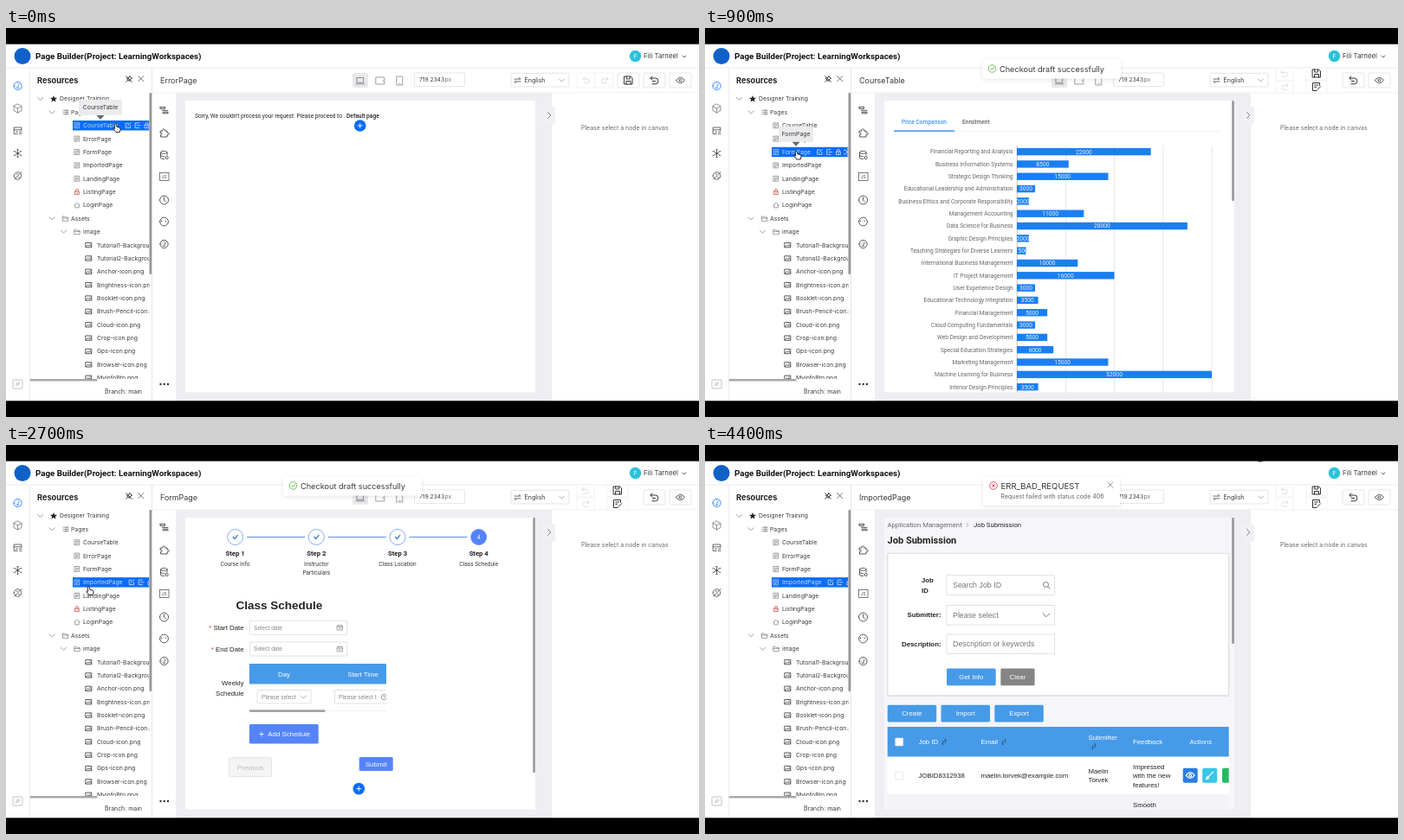
These frames come from a looping animation (800 px wide and 450 px high, 4700 ms). An HTML page:

```html
<!DOCTYPE html>
<html lang="en">
<head>
<meta charset="utf-8">
<title>Page Builder</title>
<style>
  html, body { margin: 0; width: 100%; height: 100%; overflow: hidden; background: #000; }
  svg { display: block; width: 800px; height: 450px; font-family: Inter, sans-serif; }
  .rob { font-family: Roboto, sans-serif; }
  .lib { font-family: "Liberation Sans", Arial, sans-serif; }
  .bold { font-weight: 700; }
  .med { font-weight: 500; }
  .mid { text-anchor: middle; }
  .end { text-anchor: end; }
</style>
</head>
<body>
<svg id="stage" viewBox="0 0 800 450"></svg>
<script>
const LOOP = 4700;
const BLUE = '#0b6cf5', SKY = '#469ae8', INDIGO = '#5584f9', INK = '#3a3a3a', GREY = '#888';

// Drawing helpers: y of a text is the middle of its capitals.
const text = (x, y, s, size, fill = INK, cls = '') =>
  `<text x="${x}" y="${y + size * 0.36}" font-size="${size}" fill="${fill}" class="${cls}">${s}</text>`;
const rect = (x, y, w, h, fill, stroke = 'none', r = 0) =>
  `<rect x="${x}" y="${y}" width="${w}" height="${h}" fill="${fill}" stroke="${stroke}" stroke-width=".7" rx="${r}"/>`;
const circle = (x, y, r, fill, stroke = 'none') =>
  `<circle cx="${x}" cy="${y}" r="${r}" fill="${fill}" stroke="${stroke}" stroke-width=".8"/>`;
const icon = (x, y, d, color = '#444', width = 0.9) =>
  `<path transform="translate(${x} ${y})" d="${d}" fill="none" stroke="${color}" stroke-width="${width}" stroke-linecap="round" stroke-linejoin="round"/>`;
const group = (id, body, attrs = '') => `<g id="${id}" ${attrs}>${body}</g>`;

const ring = r => `M${-r} 0a${r} ${r} 0 1 0 ${2 * r} 0a${r} ${r} 0 1 0 ${-2 * r} 0`;
const I = {
  down: 'M-3-1.5L0 1.5 3-1.5', right: 'M-1.5-3.5L2 0-1.5 3.5', cross: 'M-3-3L3 3M3-3L-3 3',
  plus: 'M-2.5 0h5M0-2.5v5', check: 'M-2.5 0L-.6 2 2.7-2',
  gauge: ring(4.6) + 'M0 1L2-2M-2.5 0h.1M0-2.7h.1M-1.3 2.2h2.6',
  cube: 'M0-5L4.5-2.5V2.5L0 5-4.5 2.5V-2.5ZM-4.5-2.5L0 0 4.5-2.5M0 0V5',
  board: 'M4.3-.5v-3.5h-8.6v7.5h4M-4.3-1.2h8.6M-2 1.2h2M2 1.3h2.5M2 3.4h2.5',
  network: 'M0-4V4M-3.6-2.3L3.6 2.3M3.6-2.3L-3.6 2.3M-1 0h2M-.8-4.3h1.6M-.8 4.3h1.6M-4.4-2.5h.8M3.6-2.5h.8M-4.4 2.5h.8M3.6 2.5h.8',
  slashed: ring(4.3) + 'M-3.5 4L4.5-4.5M-1.5-2h1.5M1 2h1.5',
  layers: 'M-4.5-3.5h5.5M-4.5-3.5v2h5.5v-2M-2 .4h6.5M-1 3.8h5.5v-1.6h-5.5Z',
  puzzle: 'M-4-2h2.5c-1-3 3.5-3 2.5 0h2.5v2.2c3-.8 3 3.2 0 2.4V5H-4V2.5c2.5.5 2.5-3 0-2Z',
  database: 'M-4-3.2c0-2 7.5-2 7.5 0s-7.5 2-7.5 0V3c0 1 2 1.6 4 1.6M3.5-3.2V0M-4 0c0 1 2 1.5 4 1.5M1.5 3a1.6 1.6 0 1 0 3.2 0a1.6 1.6 0 1 0-3.2 0',
  clock: ring(5) + 'M0-3V.3L2 2',
  chat: ring(4.9) + 'M-3-1v.8M1.8-1v.8',
  page: 'M-2.7-3h5.4v6h-5.4ZM-1.4-1.2h2.8M-1.4.3h2.8M-1.4 1.6h1.4',
  lock: 'M-2.3-.5h4.6v3.5h-4.6ZM-1.4-.5v-1.3a1.4 1.4 0 0 1 2.8 0v1.3M0 1v.8',
  home: 'M-3 0L0-2.9 3 0M-2.2-.5V2.9h4.4V-.5',
  list: 'M-1.2-2.2h4M-1.2 0h4M-1.2 2.2h4M-2.9-2.2h.1M-2.9 0h.1M-2.9 2.2h.1',
  folder: 'M-3.2 2.6v-5h2.4l.9 1.1h3.1v3.9ZM-3.2-.3h6.4',
  image: 'M-3.3-2.7h6.6v5.4h-6.6ZM-3 2l2-2.2 1.5 1.4L1.8 0 3.2 1.6M1.3-1.3h.2',
  edit: 'M.5-2.5h-3.3v5.3h5.3V0M-.8.8L3-3',
  exit: 'M1.8-2.8h-4.5v5.6h4.5M-.8 0h4',
  pin: 'M.5-3.5L3.5-.5M1-3L-1-1-2.8-.8.8 2.8 1 1 3-1M-1 1L-3.3 3.3M-3.3-3.3L3.3 3.3',
  laptop: 'M-3.7-3.5h7.4v5.7h-7.4ZM-5 3.8h10', tablet: 'M-4.8-4h9.6v8h-9.6ZM3.2-.4v.8', phone: 'M-3.3-5h6.6v10h-6.6ZM-.8 3.2h1.6',
  undo: 'M-2-3.5L-4-1.7-2 0M-4-1.7H1a2.4 2.4 0 0 1 0 4.9H-3', redo: 'M2-3.5L4-1.7 2 0M4-1.7H-1a2.4 2.4 0 0 0 0 4.9H3',
  revert: 'M-2.5-4.5L-4.5-2.5-2.5-.6M-4.5-2.5H1a3.3 3.3 0 0 1 0 6.8H-2.5M-2 1h3',
  save: 'M-4.5-4.5h7l2 2v7h-9ZM-2.3-4.5v3h4v-3M-2.5 4.5V1h5v3.5',
  saveEdit: 'M0 4.5h-4.5v-9h8v3M-2.3-2h4M-2.3.3h2M1 3.5L4.5-.2',
  eye: 'M-5 0Q0-6.5 5 0Q0 6.5-5 0M-1.4 0a1.4 1.4 0 1 0 2.8 0a1.4 1.4 0 1 0-2.8 0',
  swap: 'M-3.5-1.4h7l-1.8-1.6M3.5 1.4h-7L-1.7 3',
  calendar: 'M-3-2.4h6v5.2h-6ZM-3-.8h6M-1.4-3.2v1M1.4-3.2v1M-1.3 1h2.6',
  search: 'M-3.5-.5a3 3 0 1 0 6 0a3 3 0 1 0-6 0M1.8 1.8L4 4',
  sort: 'M-1.3 3V-1M1.2-3V1M1.2-3l1 1M-1.3 3l-1-1', brush: 'M4-4L-1 1M-1 1q-2.5 0-3 3.4q3.2-.2 3-3.4'
};

// Tree panel
const rowY = i => 82 + 15.37 * i;
const pages = ['CourseTable', 'ErrorPage', 'FormPage', 'ImportedPage', 'LandingPage', 'ListingPage', 'LoginPage'];
const files = ['Tutorial1-Background.png', 'Tutorial2-Background.png', 'Anchor-icon.png', 'Brightness-icon.png',
  'Booklet-icon.png', 'Brush-Pencil-icon.png', 'Cloud-icon.png', 'Crop-icon.png', 'Gps-icon.png',
  'Browser-icon.png', 'MyinfoBtn.png'];
const label = (x, i, s, fill) => text(x, rowY(i), s, 6.85, fill);
const rowBox = (i, fill) => rect(77, rowY(i) - 5.7, 88.5, 11.4, fill);

function pageRow(s, i) {
  const glyph = s === 'ListingPage' ? I.lock : s === 'LoginPage' ? I.home : I.page;
  return icon(82, rowY(i + 2), glyph, s === 'ListingPage' ? '#c0392b' : '#777', 0.7) + label(89, i + 2, s);
}

function selectedRow(i, firstIcon) {
  const y = rowY(i + 2);
  return group('select' + i, rowBox(i + 2, BLUE) + icon(82, y, I.page, '#bcd8ff', 0.7) +
    label(89, i + 2, pages[i], '#c4dcff') +
    [I.edit, I.exit, I.lock, I.network].map((d, k) => icon(firstIcon + k * 10.8, y, d, '#d6e6ff', 0.8)).join(''));
}

function tooltip(id, x, y, w, s) {
  return group(id, rect(x - w / 2, y - 9, w, 18, '#ebebee', 'none', 2) +
    `<path d="M${x - 4.5} ${y + 9}h9l-4.5 5z" fill="#686868"/>` + text(x, y, s, 6.85, INK, 'mid'));
}

const tree = `<g clip-path="url(#treeClip)">` +
  [[39.5, 0], [53, 1], [53, 9], [66.5, 10]].map(([x, i]) => icon(x, rowY(i), I.down, '#777', 0.7)).join('') +
  `<path transform="translate(55 82)" d="M0-4L1.1-1.3 4-1.2 1.8.7 2.5 3.5 0 2-2.5 3.5-1.8.7-4-1.2-1.1-1.3Z" fill="#222"/>` +
  label(62, 0, 'Designer Training') + icon(69, rowY(1), I.list, '#444', 0.8) + label(75, 1, 'Pages') +
  group('hover', rowBox(4, '#f3f3f5')) +
  pages.map(pageRow).join('') +
  icon(68.5, rowY(9), I.folder, '#777', 0.7) + label(75, 9, 'Assets') +
  icon(82, rowY(10), I.folder, '#777', 0.7) + label(89, 10, 'image') +
  files.map((s, i) => icon(95.5, rowY(i + 11), I.image, '#333', 0.8) + label(105, i + 11, s)).join('') +
  selectedRow(0, 141) + selectedRow(2, 132.5) + selectedRow(3, 145) + '</g>';

// Frame around the canvas
const rail = [[67, I.gauge, BLUE], [93, I.cube, '#777'], [119, I.board], [145, I.network], [171, I.slashed]]
  .map(([y, d, c]) => icon(13.5, y, d, c, 0.8)).join('') +
  rect(8, 407, 11, 10, '#fff', '#aaa', 1) + text(13.5, 412, 'JP', 5, '#999', 'mid');
const tools = [[95, I.layers], [121, I.puzzle], [147, I.database], [199, I.clock], [224, I.chat], [250, I.gauge]]
  .map(([y, d]) => icon(182.5, y, d)).join('') +
  rect(177.5, 167.5, 10.5, 9, 'none', '#444') + text(182.7, 172, 'JS', 5, '#444', 'mid') +
  [178.5, 182.7, 187].map(x => circle(x, 412, 1.2, '#333')).join('');

const shell = rect(0, 18, 800, 414, '#fff') +
  rect(0, 45.5, 800, 1, '#ececef') + rect(27, 46, 1, 386, '#ececef') + rect(168, 46, 1, 386, '#e6e6ea') +
  circle(19, 32.5, 9.5, '#0f61c9') +
  text(34, 32.5, 'Page Builder(Project: LearningWorkspaces)', 9.75, '#111', 'rob bold') +
  circle(726.5, 32.5, 6.7, '#2cc3d9') + text(726.5, 32.5, 'F', 6.8, '#fff', 'mid') +
  text(736, 32.5, 'Fili Tarneel', 7.8) + icon(783, 33, 'M-2-1L0 1 2-1', '#444', 0.8) +
  rail + text(36, 60.5, 'Resources', 9.2, '#222', 'bold') +
  icon(142, 59, I.pin, '#333', 0.9) +
  icon(155.7, 58.7, I.cross, '#555', 0.8) + tree +
  rect(165.5, 75, 2.7, 210, '#979799', 'none', 1.2) + rect(27.5, 406, 78, 2.6, '#a9a9ab', 'none', 1.2) +
  text(114, 420, 'Branch: main', 6.95) + tools +
  rect(196, 75, 434, 357, '#eeeef3') + rect(169, 74.5, 631, 0.7, '#ececf0') +
  rect(400, 52, 18, 17, '#e9e9ec', 'none', 2) + icon(409, 61, I.laptop, '#777', 0.8) +
  icon(432, 61, I.tablet, '#888', 0.8) + icon(454.5, 61, I.phone, '#888', 0.8) +
  rect(471.5, 52, 58, 15.5, '#fff', '#ddd', 1) + text(477, 59.7, '719.2343', 6.7) + text(506.5, 59.7, 'px', 6.7, '#777') +
  rect(583, 52.3, 67, 15.7, '#fff', '#d9d9dd', 1.5) + icon(590.5, 60.5, I.swap, '#444', 0.8) +
  text(598.5, 60.3, 'English', 7.05) + icon(641.5, 60.5, I.down, '#888', 0.7) +
  rect(736, 52, 25, 17, '#fff', '#dcdce0', 2) + icon(748.5, 60.5, I.revert, '#333', 1) +
  rect(766, 52, 25, 17, '#fff', '#dcdce0', 2) + icon(778.5, 60.5, I.eye) +
  text(664, 115.7, 'Please select a node in canvas', 6.93, '#666');

const toolbars =
  group('wideBar', rect(659, 52, 21, 17, '#fff', '#eee') + rect(680, 52, 21, 17, '#fff', '#eee') +
    icon(670, 60.5, I.undo, '#d8d8d8') + icon(691, 60.5, I.redo, '#d8d8d8') +
    rect(706, 52, 25, 17, '#fff', '#dcdce0', 2) + icon(718.5, 60.5, I.save, '#333', 1)) +
  group('stackedBar', [46, 61].map(y => rect(659, y, 20, 14, '#fff', '#eee') + rect(694, y, 24, 14, '#fff', '#eee')).join('') +
    icon(669, 53, I.undo, '#d8d8d8', 0.8) + icon(669, 68, I.redo, '#d8d8d8', 0.8) +
    icon(706, 52.5, I.save, '#333', 1) + icon(706, 68, I.saveEdit, '#333', 1));

// Canvas pages
const plus = (x, y) => circle(x, y, 6.8, BLUE) + icon(x, y, I.plus, '#fff');
const sheet = (fill = '#fff') => rect(207, 84, 404, 337.5, fill);
const scroll = bottom => rect(608.3, 84, 2.5, bottom - 84, '#939396', 'none', 1);
const button = (x, y, w, h, s, size, fill) => rect(x, y, w, h, fill, 'none', 1.5) +
  text(x + w / 2, y + h / 2, s, size, '#fff', 'lib mid');

const errorPage = sheet() +
  text(218, 101.5, "Sorry, We couldn't process your request. Please proceed to", 6.57, '#222', 'rob') +
  text(393, 101.5, 'Default page', 6.65, '#222', 'rob med') + plus(408.7, 113);

const courses = [['Financial Reporting and Analysis', 22000], ['Business Information Systems', 8500],
  ['Strategic Design Thinking', 15000], ['Educational Leadership and Administration', 3000],
  ['Business Ethics and Corporate Responsibility', 2000], ['Management Accounting', 11000],
  ['Data Science for Business', 28000], ['Graphic Design Principles', 2000],
  ['Teaching Strategies for Diverse Learners', 1500], ['International Business Management', 10000],
  ['IT Project Management', 16000], ['User Experience Design', 3000], ['Educational Technology Integration', 3500],
  ['Financial Management', 5000], ['Cloud Computing Fundamentals', 3000], ['Web Design and Development', 5000],
  ['Special Education Strategies', 6000], ['Marketing Management', 15000],
  ['Machine Learning for Business', 32000], ['Interior Design Principles', 3500]];
const barY = i => 143.1 + 14.32 * i;
const barW = price => price * 225 / 32000;

const chartPage = sheet() + text(227, 108.5, 'Price Comparison', 6.56, '#1677ff', 'rob') +
  text(297, 108.5, 'Enrollment', 6.6, INK, 'rob') +
  rect(218, 119, 378, 0.7, '#eee') + rect(218, 118.5, 70, 1.2, '#1677ff') +
  [0, 1, 2, 3, 4].map(k => rect(359.8 + k * 56.25, 136, 0.7, 285.5, k ? '#dcdce2' : '#aaa')).join('') +
  courses.map(([s], i) => text(355.5, barY(i), s, 6.6, '#666', 'rob end')).join('') +
  group('bars', courses.map(([, p], i) => rect(360, barY(i) - 4.2, barW(p), 8.4, '#1b7ff2')).join('')) +
  group('prices', courses.map(([, p], i) => text(360 + barW(p) / 2, barY(i), p, 6.7, '#fff', 'rob mid')).join('')) +
  scroll(200);

const steps = [['Course Info'], ['Instructor', 'Particulars'], ['Class Location'], ['Class Schedule']];
const dateField = (y, s) => `<text x="274.5" y="${y + 2.8}" font-size="7.8" class="lib end" fill="#222"><tspan fill="#e03131">*</tspan> ${s}</text>` +
  rect(281.3, y - 8, 112.5, 16, '#fff', '#d4d4d8', 1) + text(286, y, 'Select date', 6.6, GREY, 'lib') + icon(385.5, y, I.calendar, GREY, 0.7);

const formPage = sheet() + steps.map((lines, i) => {
  const x = 264.6 + i * 93.7, last = i === 3;
  return circle(x, 106.5, 9, last ? INDIGO : '#fff', last ? INDIGO : '#6f96ee') +
    (last ? text(x, 106.5, '4', 6.6, '#fff', 'rob mid') : icon(x, 106.5, I.check, '#3d7be8', 1.2) + rect(x + 13.5, 106, 67, 1, '#5b8fe8')) +
    text(x, 125, 'Step ' + (i + 1), 7.7, '#222', 'rob bold mid') +
    lines.map((s, k) => text(x, 137.3 + k * 10, s, 6.6, INK, 'rob mid')).join('');
}).join('') +
  text(265.5, 185.5, 'Class Schedule', 13.5, '#222', 'lib bold') +
  dateField(211.3, 'Start Date') + dateField(236, 'End Date') +
  text(274.5, 275, 'Weekly', 7.8, '#222', 'lib end') + text(274.5, 287, 'Schedule', 7.8, '#222', 'lib end') +
  rect(281, 253, 158, 23.5, SKY) + text(321, 265, 'Day', 7.8, '#fff', 'lib mid') + text(412, 265, 'Start Time', 7.8, '#fff', 'lib mid') +
  rect(290, 283.5, 62, 15.5, '#fff', '#d4d4d8', 1) + text(295, 291.5, 'Please select', 6.7, GREY, 'lib') + icon(343.5, 291.5, I.down, GREY, 0.7) +
  `<path d="M439 283.5H379.5V299H439" fill="none" stroke="#d4d4d8" stroke-width=".7"/>` +
  `<g clip-path="url(#cellClip)">${text(384, 291.5, 'Please select t', 6.7, GREY, 'lib')}</g>` +
  `<g clip-path="url(#tableClip)">${icon(436.3, 291.5, ring(3.2) + 'M0-1.8V.2h1.5', '#777', 0.7)}</g>` +
  rect(281, 307, 158, 0.6, '#e4e4e8') + rect(281, 306.3, 87.5, 2.8, '#a3a3a6', 'none', 1.2) +
  rect(281, 323, 79.7, 22.5, INDIGO, 'none', 1.5) + icon(295, 334.5, I.plus, '#fff', 0.8) + text(302.3, 334.5, 'Add Schedule', 7.85, '#fff', 'lib') +
  rect(257.5, 361.7, 49, 22, '#f4f4f5', '#dcdcdf', 1) + text(282, 372.8, 'Previous', 7.8, '#bbb', 'lib mid') +
  button(407.7, 361, 39, 16, 'Submit', 8, INDIGO) + plus(407.3, 397.6) + scroll(379);

const field = (y, s, glyph) => rect(279, y - 11.3, 124.5, 22.6, '#fff', '#d4d4d8') + text(286, y, s, 8.85, '#777', 'lib') +
  (glyph ? icon(394, y, glyph, '#666') : '');
const cell = (x, y, s, fill = '#222', cls = '') => text(x, y, s, 7.8, fill, 'lib ' + cls);

const jobsPage = sheet('#f6f6fa') +
  text(210.5, 92.5, 'Application Management', 7.73, '#666', 'rob') + icon(303, 92.5, 'M-1-2L1 0-1 2', '#888', 0.7) +
  text(310, 92.5, 'Job Submission', 7.7, '#222', 'rob') + text(210.5, 110.5, 'Job Submission', 11.05, '#222', 'rob bold') +
  rect(210.3, 125, 395, 166, '#e2e2e7', 'none', 1) + rect(211, 125.3, 393.5, 164.5, '#fff', '#d4d4d8', 1) +
  cell(250, 156.5, 'Job', '#222', 'bold') + cell(250, 168, 'ID', '#222', 'bold') +
  cell(272.5, 196.5, 'Submitter:', '#222', 'bold end') + cell(272.5, 230, 'Description:', '#222', 'bold end') +
  field(162, 'Search Job ID', I.search) + field(196.7, 'Please select', 'M-4-2L0 2 4-2') + field(230.3, 'Description or keywords') +
  button(279, 258.5, 56.7, 19.7, 'Get Info', 7.9, SKY) + button(341.3, 258.5, 39.3, 19.7, 'Clear', 7.9, '#858585') +
  ['Create', 'Import', 'Export'].map((s, i) => button(210.7 + i * 61.8, 300.7, 56.5, 19.8, s, 7.8, SKY)).join('') +
  rect(210.7, 360, 394, 44, '#fff') + rect(210.7, 404, 394, 17.5, '#f3f3f8') + rect(210.7, 326, 394, 34.5, SKY) +
  rect(219.7, 339, 9, 9, '#fff', '#ddd', 1) + rect(219.7, 378, 9, 9, '#fff', '#ddd', 1) +
  cell(246.5, 343.3, 'Job ID', '#fff') + cell(318.5, 343.3, 'Email', '#fff') + cell(442.5, 338.3, 'Submitter', '#fff') +
  cell(494, 343.3, 'Feedback', '#fff') + cell(559.5, 343.3, 'Actions', '#fff') +
  [[276, 343.5], [345, 343.5], [449, 348.7]].map(([x, y]) => icon(x, y, I.sort, '#345', 0.8)).join('') +
  cell(246.5, 382.5, 'JOBID8312938') + cell(318.5, 382.5, 'maelin.torvek@example.com') +
  cell(442.5, 377.5, 'Maelin') + cell(442.5, 387.5, 'Torvek') +
  ['Impressed', 'with the new', 'features!'].map((s, i) => cell(494, 372.3 + i * 10.2, s)).join('') + cell(494, 416, 'Smooth') +
  rect(551.7, 373.7, 17, 17, '#2b7de1', 'none', 2) + icon(560.2, 382.2, I.eye, '#fff', 1.2) +
  rect(574.2, 373.7, 17, 17, '#39c6e8', 'none', 2) + icon(582.7, 382.2, I.brush, '#fff', 1.2) +
  `<path d="M604.7 373.7h-5.7q-2 0-2 2v13q0 2 2 2h5.7z" fill="#27b961"/>` + scroll(230);

const canvasPages = { errorPage, chartPage, formPage, jobsPage };
const titles = { errorPage: 'ErrorPage', chartPage: 'CourseTable', formPage: 'FormPage', jobsPage: 'ImportedPage' };

const toasts =
  group('okToast', rect(320, 36, 160, 22.5, '#fff', 'none', 2) + circle(331.5, 47, 4.3, '#fff', '#4caf2f') + icon(331.5, 47, 'M-1.8 0L-.4 1.4 2-1.4', '#4caf2f') +
    text(340, 47.3, 'Checkout draft successfully', 9.17), 'filter="url(#shadow)"') +
  group('errToast', rect(321, 37.5, 158, 32.5, '#fff', 'none', 2) + circle(333, 47, 4.3, '#fff', '#d9363e') + icon(333, 47, 'M-1.4-1.4L1.4 1.4M1.4-1.4L-1.4 1.4', '#d9363e') +
    text(341.5, 47.3, 'ERR_BAD_REQUEST', 9.55) + text(341.5, 59.7, 'Request failed with status code 406', 7.03, '#666') +
    icon(468, 46, I.cross, '#777', 0.7), 'filter="url(#shadow)"');

const clip = (id, x, y, w, h) => `<clipPath id="${id}">${rect(x, y, w, h, '#000')}</clipPath>`;
const hand = `<path d="M-2.8-4.3q1-1.2 1.9 0l.8 3.1 3.2.9q1.2.5.9 2L3.2 5h-4.3L-4.2 1.1q.2-1.3 1.9-.2Z" fill="#fff" stroke="#111" stroke-width=".9" stroke-linejoin="round"/>`;

document.getElementById('stage').innerHTML =
  `<defs>${clip('treeClip', 28, 75, 137.5, 331)}${clip('cellClip', 379, 283, 49, 17)}${clip('tableClip', 379, 283, 60, 17)}
  <filter id="shadow" x="-10%" y="-40%" width="120%" height="200%"><feDropShadow dx="0" dy="1.5" stdDeviation="2.2" flood-opacity=".1"/></filter></defs>` +
  shell + toolbars +
  Object.keys(canvasPages).map(id => group(id, text(178, 60.5, titles[id], 8.95) + canvasPages[id])).join('') +
  rect(620, 91, 14, 21, '#f1f1f5', 'none', 2) + icon(627, 101, I.right, '#777') +
  toasts + tooltip('tableTip', 109, 92, 50, 'CourseTable') + tooltip('formTip', 105, 122.7, 40, 'FormPage') +
  group('cursor', hand) + rect(0, 0, 800, 18.7, '#000') + rect(0, 431.3, 800, 18.7, '#000');

// Timeline
const $ = id => document.getElementById(id);
const show = (id, opacity) => $(id).setAttribute('opacity', +opacity);
const ramp = (t, from, to) => Math.min(1, Math.max(0, (t - from) / (to - from)));
const path = [[100, 128, 115.5], [600, 107, 147], [1500, 107, 147], [1900, 92, 136.5], [2100, 92, 136.5],
  [2300, 110, 147], [2500, 110, 147], [2700, 97, 168.5], [2800, 97, 168.5], [3100, 560, 170], [3200, 560, 170], [3400, 640, 14]];

function cursorAt(t) {
  const next = path.findIndex(key => key[0] > t);
  if (next === 0) return path[0].slice(1);
  if (next < 0) return path[path.length - 1].slice(1);
  const [t0, x0, y0] = path[next - 1], [t1, x1, y1] = path[next];
  const k = ramp(t, t0, t1);
  return [x0 + (x1 - x0) * k, y0 + (y1 - y0) * k];
}

function draw(time) {
  const t = Math.floor(time % LOOP / 100) * 100;
  const current = t < 200 ? 'errorPage' : t < 1700 ? 'chartPage' : t < 2900 ? 'formPage' : 'jobsPage';
  for (const id in canvasPages) show(id, id === current);

  show('wideBar', t < 300);
  show('stackedBar', t >= 300);
  show('select0', t < 800);
  show('select2', t >= 800 && t < 2700);
  show('select3', t >= 2700);
  show('hover', t >= 500 && t < 800);
  show('tableTip', 1 - ramp(t, 0, 200));
  show('formTip', ramp(t, 700, 900) * (1 - ramp(t, 1500, 1700)));

  const grow = 1 - (1 - ramp(t, 100, 600)) ** 3;
  $('bars').setAttribute('transform', `translate(${360 * (1 - grow)} 0) scale(${grow} 1)`);
  show('prices', t < 600 ? 0.6 * ramp(t, 300, 600) : 0.6 + 0.4 * ramp(t, 600, 1000));

  const okIn = ramp(t, 200, 500), errIn = ramp(t, 2800, 3100);
  show('okToast', okIn * (1 - ramp(t, 2700, 2900)));
  $('okToast').setAttribute('transform', `translate(0 ${-12 * (1 - okIn)})`);
  show('errToast', errIn);
  $('errToast').setAttribute('transform', `translate(0 ${-12 * (1 - errIn)})`);
  $('cursor').setAttribute('transform', `translate(${cursorAt(t)})`);
}

const start = performance.now();
function tick() {
  draw(performance.now() - start);
  requestAnimationFrame(tick);
}
tick();
</script>
</body>
</html>
```
